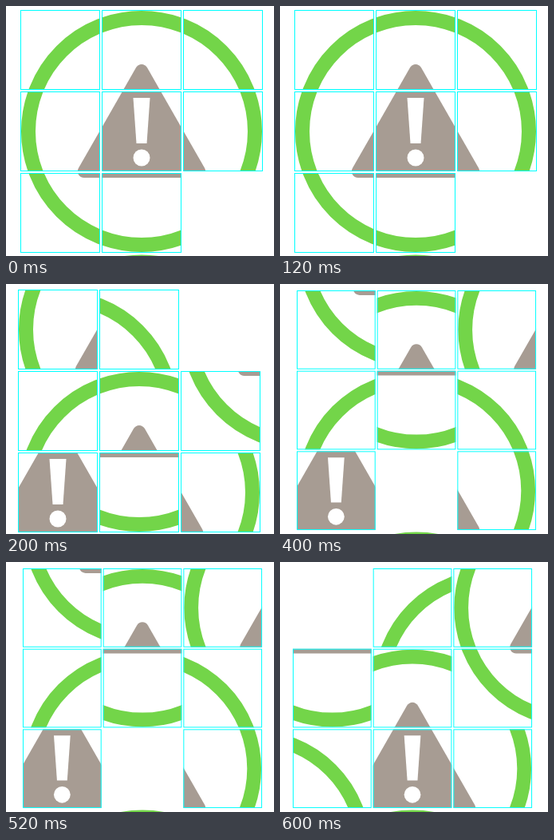
Write an HTML page with a canvas that moves like this. It is 336 by 313 pixels and loops after 800 ms.

```html
<!DOCTYPE html>
<html>
<head>
<meta charset="utf-8">
<style>
html, body { margin: 0; width: 100%; height: 100%; overflow: hidden; background: #fff; }
canvas { display: block; }
</style>
</head>
<body>
<canvas id="stage" width="336" height="313"></canvas>
<script>
const ctx = document.getElementById('stage').getContext('2d');
const GREEN = '#73d549', TAUPE = '#a79c93', CYAN = '#00ffff';
const TILE = 100, PITCH = 102, MID = 152, STEP_MS = 200;

// Each board lists the piece in every cell, row by row; 8 is the gap.
const boards = [
  { x: 18, y: 5, scale: 1, cells: [0, 1, 2, 3, 4, 5, 6, 7, 8] },
  { x: 15, y: 7, scale: 1, cells: [3, 2, 8, 0, 1, 6, 4, 7, 5] },
  { x: 21, y: 8, scale: 0.987, cells: [6, 1, 3, 0, 7, 2, 4, 8, 5] },
  { x: 16, y: 8, scale: 0.987, cells: [8, 0, 3, 7, 1, 6, 2, 4, 5] }
];

function disc(x, y, r, color) {
  ctx.fillStyle = color;
  ctx.beginPath();
  ctx.arc(x, y, r, 0, Math.PI * 2);
  ctx.fill();
}

function ring(y) {
  ctx.strokeStyle = GREEN;
  ctx.lineWidth = 18;
  ctx.beginPath();
  ctx.arc(MID, y, 142, 0, Math.PI * 2);
  ctx.stroke();
}

function picture() {
  ring(MID);

  ctx.fillStyle = TAUPE;
  ctx.beginPath();
  ctx.moveTo(MID, 210);
  ctx.arcTo(66, 210, MID, 60, 8);
  ctx.arcTo(MID, 60, 238, 210, 8);
  ctx.arcTo(238, 210, MID, 210, 8);
  ctx.fill();

  ctx.fillStyle = '#fff';
  ctx.beginPath();
  ctx.moveTo(MID - 10.5, 110);
  ctx.lineTo(MID + 10.5, 110);
  ctx.lineTo(MID + 6.5, 167);
  ctx.lineTo(MID - 6.5, 167);
  ctx.fill();
  disc(MID, 185, 10.5, '#fff');
}

function drawTile(piece, cell) {
  const col = cell % 3, row = Math.floor(cell / 3);
  ctx.save();
  ctx.translate(col * PITCH, row * PITCH);
  ctx.save();
  ctx.beginPath();
  ctx.rect(0, 0, TILE, TILE);
  ctx.clip();
  ctx.translate(-(piece % 3) * PITCH, -Math.floor(piece / 3) * PITCH);
  picture();
  ctx.restore();
  ctx.strokeStyle = CYAN;
  ctx.lineWidth = 1;
  ctx.strokeRect(0.5, 0.5, TILE - 1, TILE - 1);
  ctx.restore();
}

function draw(now) {
  const board = boards[Math.floor(now / STEP_MS) % boards.length];
  ctx.fillStyle = '#fff';
  ctx.fillRect(0, 0, 336, 313);
  ctx.save();
  ctx.translate(board.x, board.y);
  ctx.scale(board.scale, board.scale);
  ring(457.5); // next ring, peeking in at the bottom edge
  board.cells.forEach((piece, cell) => {
    if (piece !== 8) drawTile(piece, cell);
  });
  ctx.restore();
}

const start = performance.now();
function tick() {
  draw(performance.now() - start);
  requestAnimationFrame(tick);
}
tick();
</script>
</body>
</html>
```
